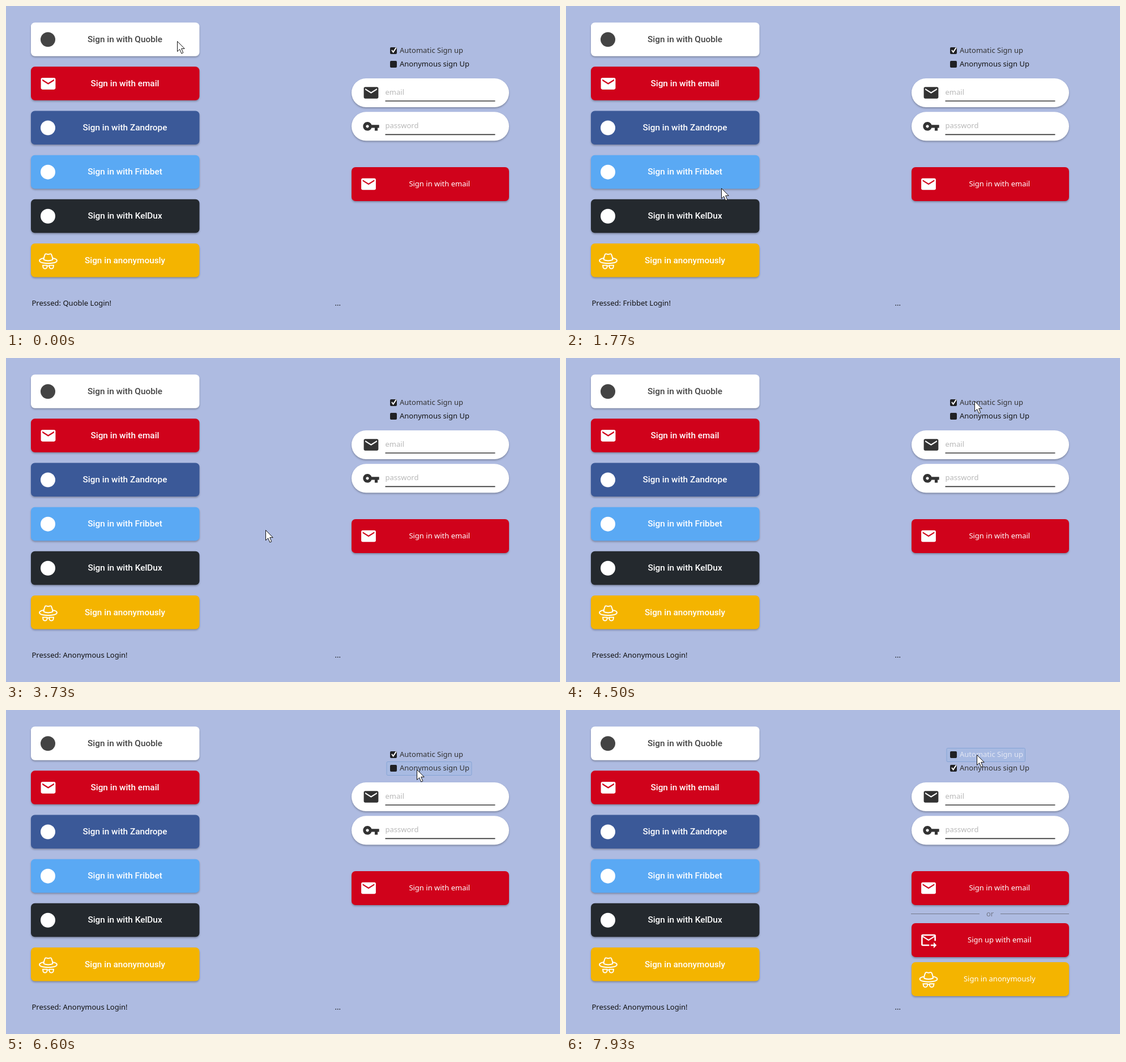
Write an HTML page that moves like this. It is 978x573 px and loops after 8 s.

```html
<!DOCTYPE html>
<html lang="en">
<head>
<meta charset="utf-8">
<title>Sign-in buttons</title>
<style>
  html, body { margin: 0; width: 100%; height: 100%; overflow: hidden; background: #aebbe1; }
  svg { display: block; width: 978px; height: 573px; }
  text { font: 13px "Noto Sans", sans-serif; white-space: pre; }
  .brand { font: 500 15.35px Roboto, sans-serif; }
  .mid { text-anchor: middle; }
  .raised { filter: drop-shadow(0 2px 1.5px rgba(0, 0, 0, .27)); }
  .line { fill: none; stroke: #fff; stroke-width: 1.9; stroke-linejoin: round; }
  .focus { fill: #a3b9e3; fill-opacity: .5; stroke: #86a5d6; }
</style>
</head>
<body>
<svg id="stage" viewBox="0 0 978 573"></svg>
<script>
const LOOP = 8000;
const RED = '#d0021b', YELLOW = '#f4b400';
const paths = {
  mail: 'M20 4H4c-1.1 0-1.99.9-1.99 2L2 18c0 1.1.9 2 2 2h16c1.1 0 2-.9 2-2V6c0-1.1-.9-2-2-2zm0 4l-8 5-8-5V6l8 5 8-5v2z',
  forward: 'M20 4H4c-1.1 0-2 .9-2 2v12c0 1.1.9 2 2 2h9v-2H4V8l8 5 8-5v5h2V6c0-1.1-.9-2-2-2zm-8 7L4 6h16l-8 5zm7 4l4 4-4 4v-3h-4v-2h4v-3z',
  key: 'M12.65 10C11.83 7.67 9.61 6 7 6c-3.31 0-6 2.69-6 6s2.69 6 6 6c2.61 0 4.83-1.67 5.65-4H17v4h4v-4h2v-4H12.65zM7 14c-1.1 0-2-.9-2-2s.9-2 2-2 2 .9 2 2-.9 2-2 2z'
};

const icon = (name, x, y, fill = '#fff') =>
  `<path d="${paths[name]}" fill="${fill}" transform="translate(${x} ${y}) scale(1.29) translate(-12 -12)"/>`;
const dot = (x, y, fill = '#fff') => `<circle cx="${x}" cy="${y}" r="13" fill="${fill}"/>`;
const spy = (x, y) => `<g class="line" transform="translate(${x} ${y})">
  <path d="M-7.5-4.5C-18-3-18 2.5-8 4Q0 5.5 8 4C18 2.5 18-3 7.5-4.5"/>
  <path d="M-8-1.5Q-7.5-7-5.8-10.5Q-5-12.8-2.5-11.8Q0-10.6 2.5-11.8Q5-12.8 5.8-10.5Q7.5-7 8-1.5Q0 1.5-8-1.5"/>
  <path d="M-10.5 8.2H-2V10.5A3.6 3.6 0 0 1-9.2 10.5V8.2M10.5 8.2H2V10.5A3.6 3.6 0 0 0 9.2 10.5V8.2M-2 9.2H2"/></g>`;
const box = (x, y, w, h, r, fill) =>
  `<rect class="raised" x="${x}" y="${y}" width="${w}" height="${h}" rx="${r}" fill="${fill}"/>`;
const text = (x, y, label, fill = '#111', cls = '') =>
  `<text x="${x}" y="${y}" fill="${fill}" class="${cls}">${label}</text>`;

const logins = [
  ['Quoble', '#fff'], ['email', RED], ['Zandrope', '#3b5998'],
  ['Fribbet', '#5aa9f4'], ['KelDux', '#24292e'], ['', YELLOW]
];
const rowY = i => 29.2 + 78.15 * i;

function loginButton([name, color], i) {
  const y = rowY(i), cy = y + 30, ink = i ? '#fff' : '#444';
  const mark = i === 1 ? icon('mail', 74.5, cy) : i === 5 ? spy(74.5, cy + .5) : dot(74, cy, ink);
  return box(44, y, 297.5, 59.5, 7, color) + mark +
    text(210, y + 34.6, name ? `Sign in with ${name}` : 'Sign in anonymously', ink, 'brand mid');
}

const formButton = (y, label, color, mark) =>
  box(610, y, 278, 60, 7, color) + mark(640, y + 30) + text(765.3, y + 34, label, '#fff', 'mid');

const field = (y, name, label) => box(610, y, 278, 51, 25.5, '#fff') +
  icon(name, 644.5, y + 25.5, '#333') + text(669.5, y + 28.7, label, '#b8b8b8') +
  `<path d="M669.5 ${y + 40}H863.5" stroke="#333" stroke-width="1.7"/>`;

const check = (id, y, w, label) => `<g id="${id}">
  <rect class="focus" x="672" y="${y - 11.5}" width="${w}" height="24" rx="2"/>
  <rect x="678" y="${y - 6}" width="12" height="12" rx="2" fill="#202124"/>
  <path class="tick" d="M681 ${y - 1}l2.6 3.6 5.2-8" fill="none" stroke="#fff" stroke-width="2"/>
  ${text(695, y + 4, label)}</g>`;

const $ = id => document.getElementById(id);
$('stage').innerHTML = `
  <clipPath id="clip"><rect id="clipRow" x="44" width="297.5" height="59.5" rx="7"/></clipPath>
  ${logins.map(loginButton).join('')}
  <g clip-path="url(#clip)"><circle id="ripple"/></g>
  ${text(45.5, 530, '', '#111').replace('<text', '<text id="status"')}
  ${text(580.5, 530, '...')}
  ${check('auto', 79, 138.5, 'Automatic Sign up')}
  ${check('anon', 103, 150, 'Anonymous sign Up')}
  ${field(128, 'mail', 'email')}${field(187.3, 'key', 'password')}
  ${formButton(285, 'Sign in with email', RED, (x, y) => icon('mail', x, y))}
  <g id="or"><path d="M609 360.5H730M767 360.5H888" stroke="#74798a"/>${text(748.5, 365, 'or', '#74798a', 'mid')}</g>
  <g id="signUp">${formButton(377, 'Sign up with email', RED, (x, y) => icon('forward', x, y))}</g>
  <g id="guest">${formButton(377, 'Sign in anonymously', YELLOW, spy)}</g>
  <path id="cursor" d="M.5.5V18.5L4.7 14.6 7.8 22 10.8 20.7 7.7 13.4H13.2Z" fill="#fff" stroke="#111"/>`;

// Cursor moves: start, end, target x, target y
const moves = [
  [0, 330, 285, 131], [570, 870, 271, 217], [1230, 1430, 271, 290], [1668, 1830, 275, 336],
  [1840, 1970, 281, 374], [2440, 2580, 284, 451], [3400, 4170, 723, 80],
  [4400, 4500, 721, 76], [6100, 6400, 725, 105], [7300, 7400, 725, 79]
];
const clicks = [[470, 1], [1030, 2], [1430, 3], [2170, 4], [2580, 5]];
const presses = [[4970, 5030, 'auto'], [5870, 5930, 'auto'], [6600, 6700, 'anon'], [7830, 7930, 'auto']];

function cursorAt(t) {
  let x = 302, y = 62;
  for (const [start, end, tx, ty] of moves) {
    const u = Math.min(1, Math.max(0, (t - start) / (end - start)));
    const k = u * u * (3 - 2 * u);
    x += (tx - x) * k;
    y += (ty - y) * k;
  }
  return [x, y];
}

function setAttrs(id, attrs) {
  for (const name in attrs) $(id).setAttribute(name, attrs[name]);
}
const show = (el, on) => { el.style.display = on ? '' : 'none'; };

function drawLogin(t) {
  const [start, row] = clicks.filter(c => t >= c[0]).pop() || [-LOOP, 0];
  const age = t - start, [cx, cy] = cursorAt(start);
  setAttrs('clipRow', { y: rowY(row) });
  setAttrs('ripple', {
    cx, cy, r: 57 + age * .9,
    'fill-opacity': .08 * Math.min(1, Math.max(0, (290 - age) / 140))
  });
  const name = row === 1 ? 'Email' : logins[row][0] || 'Anonymous';
  $('status').textContent = `Pressed: ${name} Login!`;
}

function drawForm(t, x, y) {
  const checked = { auto: true, anon: false };
  let focused, pressed;
  for (const [down, up, id] of presses) {
    if (t >= down) focused = id;
    if (t >= down && t < up) pressed = id;
    if (t >= up) checked[id] = !checked[id];
  }
  const over = x < 672 || y >= 115 || y < 67 ? '' : y < 91 ? 'auto' : 'anon';
  for (const id of ['auto', 'anon']) {
    const g = $(id);
    show(g.querySelector('.focus'), focused === id);
    show(g.querySelector('.tick'), checked[id]);
    g.querySelector('text').setAttribute('fill',
      checked[id] || pressed === id ? '#333' : over === id ? '#e3e7f4' : '#151515');
  }
  show($('or'), !checked.auto || checked.anon);
  show($('signUp'), !checked.auto);
  show($('guest'), checked.anon);
  setAttrs('guest', { transform: `translate(0 ${checked.auto ? 0 : 69})` });
}

function frame(now) {
  const t = now % LOOP, [x, y] = cursorAt(t);
  drawLogin(t);
  drawForm(t, x, y);
  setAttrs('cursor', { transform: `translate(${Math.round(x)} ${Math.round(y)})` });
  requestAnimationFrame(frame);
}
frame(0);
</script>
</body>
</html>
```
